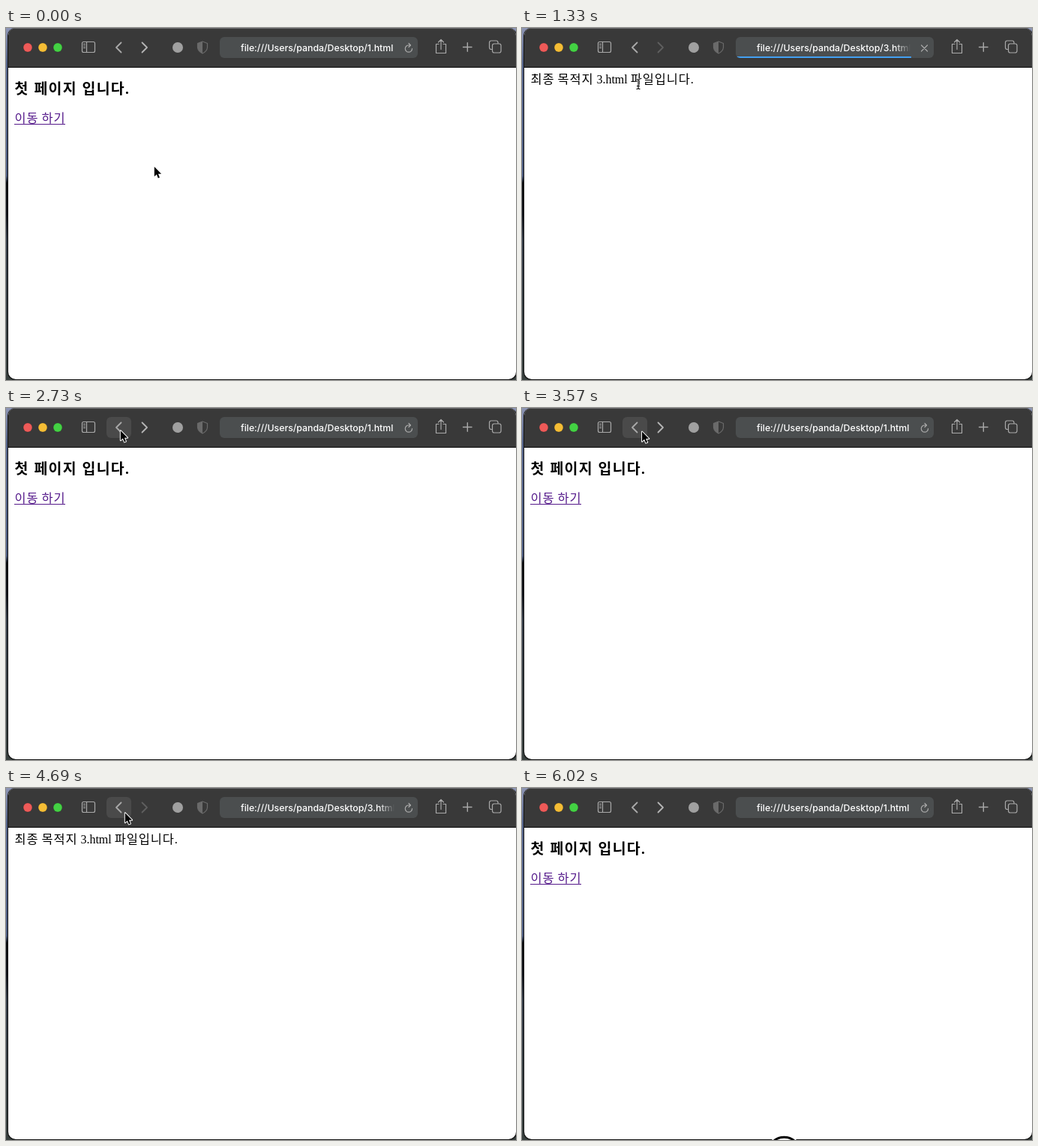
Recreate the animation shown at these times as an HTML page. Size 680x470 px, loop 6090 ms.

```html
<!DOCTYPE html>
<html lang="ko">
<head>
<meta charset="utf-8">
<style>
  html, body { margin: 0; height: 100%; overflow: hidden; background: #fff; }
  svg { display: block; }
  .page { font-family: "Liberation Serif", "Noto Sans CJK KR", "Noto Sans CJK", serif; font-size: 16.4px; font-weight: 300; letter-spacing: .9px; word-spacing: -1px; }
  .page .title { font-size: 19.4px; font-weight: 700; letter-spacing: 1.3px; word-spacing: .6px; }
  .page .latin { font-size: 16px; letter-spacing: 0; }
  .address { font: 500 12.3px Inter, sans-serif; fill: #fff; }
  .lights { stroke: #0003; stroke-width: .6; }
  .icons { fill: none; stroke: #a9a9a9; stroke-width: 1.2; stroke-linecap: round; stroke-linejoin: round; }
  .chevron { stroke-width: 1.8; }
</style>
</head>
<body>
<svg width="680" height="470" viewBox="0 0 680 470">
  <defs>
    <linearGradient id="desktop" x2="0" y2="1">
      <stop offset="0" stop-color="#8d95b4"/>
      <stop offset=".1" stop-color="#56658c"/>
      <stop offset=".42" stop-color="#4a5a80"/>
      <stop offset=".44" stop-color="#080a0e"/>
      <stop offset=".53" stop-color="#10131a"/>
      <stop offset=".6" stop-color="#333b47"/>
      <stop offset="1" stop-color="#39413f"/>
    </linearGradient>
    <linearGradient id="fade" gradientUnits="userSpaceOnUse" x1="497" x2="518">
      <stop offset="0" stop-color="#fff"/>
      <stop offset="1" stop-color="#fff" stop-opacity="0"/>
    </linearGradient>
    <clipPath id="window"><rect x="3" width="677" height="469" rx="10"/></clipPath>
    <clipPath id="field"><rect x="285" y="12" width="264" height="28" rx="6"/></clipPath>
  </defs>

  <rect width="680" height="470" fill="url(#desktop)"/>
  <rect x="2" width="679" height="470" rx="10" fill="#111"/>
  <g clip-path="url(#window)">
    <rect width="680" height="470" fill="#fff"/>
    <rect width="680" height="52" fill="#393939"/>
    <rect width="680" height="1" fill="#6a6a6c"/>
    <rect y="52" width="680" height="1" fill="#050505"/>
  </g>

  <g class="lights">
    <circle cx="29" cy="26" r="5.9" fill="#ee5a58"/>
    <circle cx="49" cy="26" r="5.9" fill="#f5bd35"/>
    <circle cx="69" cy="26" r="5.9" fill="#43d143"/>
  </g>
  <rect id="hover" y="12" width="33" height="28" rx="6"/>
  <circle cx="229" cy="26" r="7" fill="#a0a0a0"/>

  <g clip-path="url(#field)">
    <rect x="285" y="12" width="264" height="28" fill="#4b4e4f"/>
    <rect id="bar" x="285" y="38" height="2" fill="#43a0f2"/>
  </g>
  <text id="address" class="address" x="313" y="31"></text>

  <g class="icons">
    <rect x="101.5" y="18.5" width="17" height="14" rx="2"/>
    <path d="M107.5 18.5V32.5M103.5 21.5h2M103.5 24h2M103.5 26.5h2"/>
    <path id="back" class="chevron" d="M153.5 19.5L147 26L153.5 32.5"/>
    <path id="forward" class="chevron" d="M181.5 19.5L188 26L181.5 32.5"/>
    <path d="M262 18L268.5 20.5V26Q268 31 262 34Q256 31 255.5 26V20.5Z" stroke="#6a6a6a"/>
    <path d="M262 18V34Q256 31 255.5 26V20.5Z" fill="#6a6a6a" stroke="none"/>
    <path id="reload" d="M541.5 27.5A4.6 4.6 0 1 1 537 23H539M537 20.5L539.5 23L537 25.5"/>
    <path id="stop" d="M532.5 23L540.5 31M540.5 23L532.5 31"/>
    <path d="M577 21.5H573.5V33.5H586.5V21.5H583M580 28.5V16M576.5 19L580 15.5L583.5 19"/>
    <path d="M609.5 25.5H621M615.3 19.7V31.3" stroke-width="1.4"/>
    <path d="M648 28.5H647Q644.5 28.5 644.5 26V19.5Q644.5 17 647 17H653.5Q656 17 656 19.5V20.5"/>
    <rect x="648.5" y="21" width="11.5" height="12" rx="2.5"/>
  </g>

  <g id="first" class="page">
    <text class="title" x="11.5" y="88.3">첫 페이지 입니다.</text>
    <text x="11.5" y="126" fill="#551a8b">이동 하기</text>
    <rect x="11" y="128" width="68" height="1" fill="#551a8b"/>
  </g>
  <g id="last" class="page">
    <text x="11.5" y="74">최종 목적지 <tspan class="latin">3.html</tspan> 파일입니다.</text>
  </g>

  <g id="ring" fill="none">
    <circle cx="349.5" cy="488" r="22" fill="#fff" stroke="#fff" stroke-width="5"/>
    <circle cx="349.5" cy="488" r="21.8" stroke="#000" stroke-width="3"/>
  </g>

  <g id="cursor" stroke-linejoin="round">
    <path id="arrow" transform="translate(.8 1.3) scale(.9)" d="M0 0V14.5L3.4 11.4L5.6 16.8L7.9 15.8L5.7 10.5H10.3Z" fill="#000" stroke="#fff" stroke-width="2.2" paint-order="stroke"/>
    <path id="hand" d="M-2 1Q-2 -1 -.3 -1Q1.3 -1 1.6 1L2.3 5Q4.2 3.8 5 5.5Q6.7 4.8 7.2 6.3Q9 6 9 8.3Q9.3 11 7.6 13V15.3H.6V13.3L-4.3 8.3Q-4.6 6.3 -2.6 6.8L-1 8.3ZM2.3 9.5V12.5M4.3 9.5V12.5M6.2 9.5V12.5" fill="#fff" stroke="#000"/>
    <g id="beam" fill="none">
      <path d="M-2.5 -6.5Q0 -6.5 0 -5Q0 -6.5 2.5 -6.5M0 -5V5M-2 2.5H2M-2.5 6.5Q0 6.5 0 5Q0 6.5 2.5 6.5" stroke="#fff" stroke-width="2.5"/>
      <path d="M-2.5 -6.5Q0 -6.5 0 -5Q0 -6.5 2.5 -6.5M0 -5V5M-2 2.5H2M-2.5 6.5Q0 6.5 0 5Q0 6.5 2.5 6.5" stroke="#000" stroke-width="1.1"/>
    </g>
  </g>
</svg>
<script>
const LOOP = 6090, STEP = 70;
const el = id => document.getElementById(id);
const show = (id, on) => { el(id).style.display = on ? '' : 'none'; };

// Pointer path: [ms, x, y]
const path = [
  [0, 197, 184], [140, 197, 184], [630, 67, 123], [1050, 67, 123],
  [1330, 155, 75], [1400, 155, 66], [1540, 151, 38], [1820, 152, 37],
  [1890, 152, 37], [2100, 152, 29], [3500, 152, 29], [3710, 180, 34],
  [4410, 180, 34], [4620, 158, 32], [5040, 158, 32], [5250, 408, 451],
  [5460, 408, 451], [5600, 408, 490], [LOOP, 408, 490]
];

function pointerAt(t) {
  const i = path.findIndex(key => key[0] > t);
  const [t0, x0, y0] = path[i - 1], [t1, x1, y1] = path[i];
  const p = (t - t0) / (t1 - t0), ease = p * p * (3 - 2 * p);
  return [x0 + (x1 - x0) * ease, y0 + (y1 - y0) * ease];
}

function draw(t) {
  const within = (from, to) => t >= from && t < to;
  const [x, y] = pointerAt(t);
  const last = within(980, 2590) || within(4130, 4830);
  const loading = within(910, 1470);

  show('first', !last);
  show('last', last);
  el('address').textContent = `file:///Users/panda/Desktop/${last ? 3 : 1}.html`;
  el('address').style.fill = last ? 'url(#fade)' : '';
  show('reload', !loading);
  show('stop', loading);
  show('bar', loading);
  el('bar').setAttribute('width', 264 * Math.max(0, Math.min(1, (t - 910) / 474)));

  const inBar = y > 12 && y < 40;
  const overBack = inBar && x > 134 && x < 168;
  const overForward = inBar && x >= 168 && x < 201 && !last;
  const pressed = within(2520, 2590) || within(3920, 4130) || within(4760, 4830);
  show('hover', overBack || overForward);
  el('hover').setAttribute('x', overBack ? 134 : 168);
  el('hover').setAttribute('fill', pressed ? '#5d5d5d' : '#4a4a4a');
  el('back').style.stroke = pressed && overBack ? '#fff' : '';
  el('forward').style.stroke = last ? '#5f5f5f' : pressed && overForward ? '#fff' : '#b5b5b5';

  const hand = !last && x > 11 && x < 79 && y > 110 && y < 130;
  const beam = last && x < 229 && y > 56 && y < 82;
  show('hand', hand);
  show('beam', beam);
  show('arrow', !hand && !beam);
  el('cursor').setAttribute('transform', `translate(${x} ${y})`);
  show('ring', t >= 6020);
}

const start = performance.now();
function tick() {
  const t = (performance.now() - start) % LOOP;
  draw(Math.floor(t / STEP) * STEP);
  requestAnimationFrame(tick);
}
tick();
</script>
</body>
</html>
```
